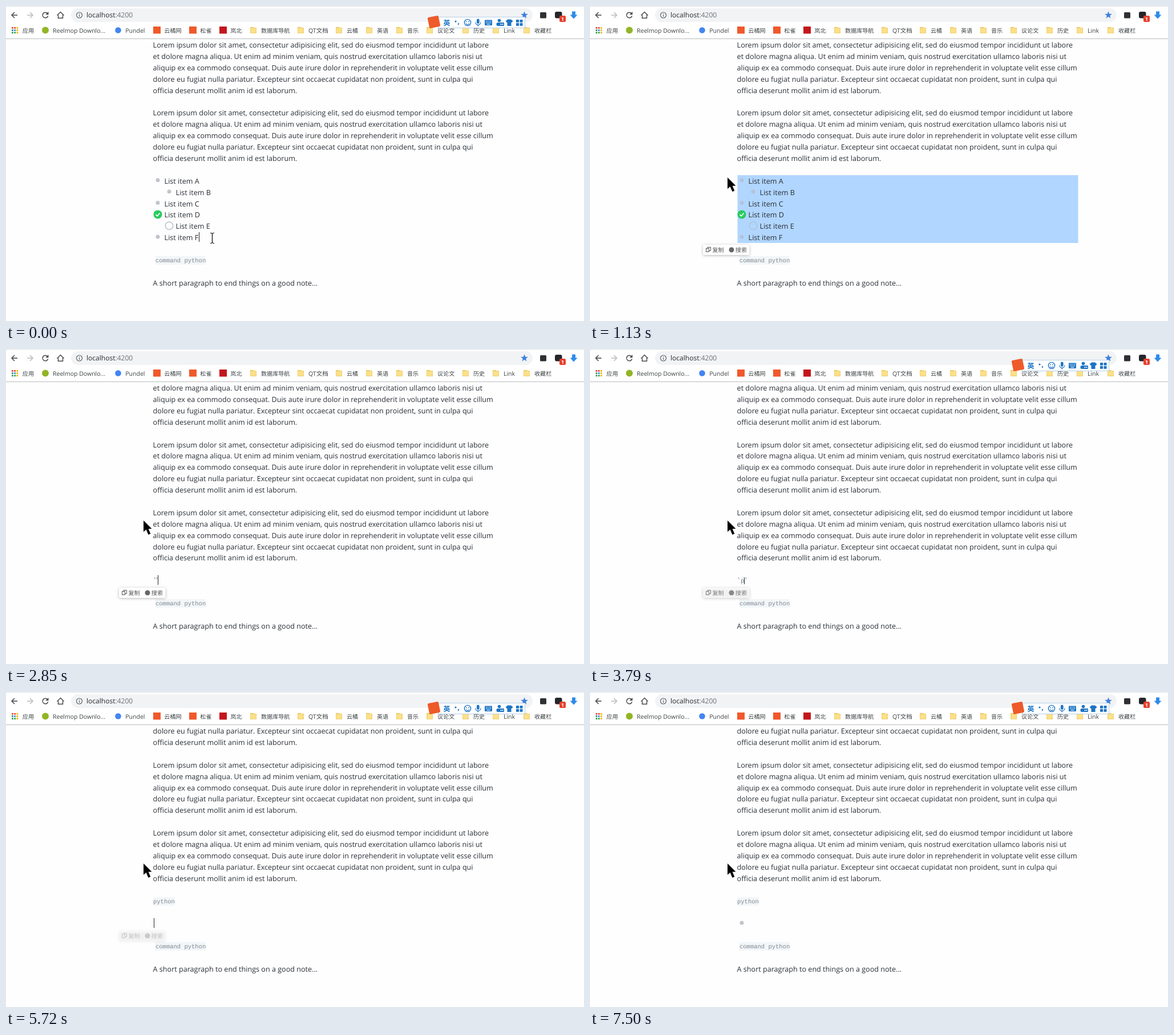
Write an HTML page with a canvas that moves like this. It is 1013 px wide and 553 px high and loops after 8 s.

```html
<!DOCTYPE html>
<html lang="zh">
<head>
<meta charset="utf-8">
<title>Notes editor</title>
<style>
html, body { margin: 0; width: 100%; height: 100%; overflow: hidden; background: #fefefe; }
canvas { display: block; width: 1013px; height: 553px; }
</style>
</head>
<body>
<canvas id="stage" width="1013" height="553"></canvas>
<script>
const ctx = document.getElementById('stage').getContext('2d');
ctx.textRendering = 'geometricPrecision';

const LOOP = 8000, PITCH = 19.88, LEFT = 258, CHAR = 6.3;
const INK = '#2a2f36', GREY = '#5f6368', BLUE = '#1b74c5';
const BODY = '12.58px "Open Sans", sans-serif';
const MONO = '10.5px "Liberation Mono", monospace';
const SMALL = '10.5px "Open Sans", "Noto Sans CJK SC", "Noto Sans CJK", sans-serif';
const HAN = '10.1px "Noto Sans CJK SC", "Noto Sans CJK", sans-serif';

const LOREM = [
  'Lorem ipsum dolor sit amet, consectetur adipisicing elit, sed do eiusmod tempor incididunt ut labore',
  'et dolore magna aliqua. Ut enim ad minim veniam, quis nostrud exercitation ullamco laboris nisi ut',
  'aliquip ex ea commodo consequat. Duis aute irure dolor in reprehenderit in voluptate velit esse cillum',
  'dolore eu fugiat nulla pariatur. Excepteur sint occaecat cupidatat non proident, sunt in culpa qui',
  'officia deserunt mollit anim id est laborum.'
];
const ITEMS = [['A', 0, 'dot'], ['B', 1, 'dot'], ['C', 0, 'dot'], ['D', 0, 'done'], ['E', 1, 'todo'], ['F', 0, 'dot']];
const KEYS = [3710, 4020, 4260, 4560, 4680, 4790];
const FOLDERS = [[428, '数据库导航'], [511, 'QT文档'], [578, '云橘'], [631, '英语'], [684, '音乐'],
  [737, '议论文'], [800, '历史'], [853, 'Link'], [907, '收藏栏']];

// Last value whose start time has been reached
const at = (t, steps) => steps.reduce((v, s) => t >= s[0] ? s[1] : v, steps[0][1]);
const within = (t, a, b) => t >= a && t < b;
const rowY = k => 68.5 + PITCH * k;

function text(s, x, y, font, color) {
  ctx.font = font;
  ctx.fillStyle = color;
  ctx.fillText(s, x, y);
}
function rect(x, y, w, h, color) {
  ctx.fillStyle = color;
  ctx.fillRect(x, y, w, h);
}
function round(x, y, w, h, r, color) {
  ctx.beginPath();
  ctx.roundRect(x, y, w, h, r);
  ctx.fillStyle = color;
  ctx.fill();
}
function disc(x, y, r, color) {
  ctx.beginPath();
  ctx.arc(x, y, r, 0, 7);
  ctx.fillStyle = color;
  ctx.fill();
}
function ring(x, y, r, color, w) {
  ctx.beginPath();
  ctx.arc(x, y, r, 0, 7);
  ctx.strokeStyle = color;
  ctx.lineWidth = w;
  ctx.stroke();
}
function trace(pts) {
  ctx.beginPath();
  for (let i = 0; i < pts.length; i += 2) ctx.lineTo(pts[i], pts[i + 1]);
}
function line(pts, color, w) {
  trace(pts);
  ctx.strokeStyle = color;
  ctx.lineWidth = w;
  ctx.stroke();
}
function poly(pts, color) {
  trace(pts);
  ctx.fillStyle = color;
  ctx.fill();
}

function row(s, k, x = LEFT) {
  text(s, x - 0.4, Math.round(rowY(k) + 4.7), BODY, INK);
}
function paragraph(k) {
  LOREM.forEach((s, i) => row(s, k + i));
}
function code(s, x, k) {
  const y = Math.round(rowY(k));
  rect(x, y - 7, s.length * CHAR, 15, '#f2f6f8');
  text(s, x, y + 4, MONO, '#7f8992');
}
function caret(x, small) {
  rect(x, small ? 401 : 397, 1, small ? 12 : 17, '#222');
}

function marker(kind, x, y, selected) {
  if (kind === 'dot') disc(x, y - 1.3, 3.5, selected ? '#b3c3d6' : '#c1c5cc');
  if (kind === 'todo') ring(x, y - 0.8, 6.8, selected ? '#b0c3d8' : '#bcc1c8', 1.5);
  if (kind === 'done') {
    disc(x, y - 0.8, 7.5, '#27cc5f');
    line([x - 3.4, y - 0.6, x - 0.9, y + 2, x + 3.7, y - 3.2], '#fff', 1.7);
  }
}
function list(t) {
  const first = at(t, [[0, 6], [240, 5], [290, 3], [360, 1], [440, 0]]);
  ITEMS.forEach(([name, depth, kind], i) => {
    const k = 12 + i, x = LEFT + depth * 20, on = i >= first;
    const fresh = i === first && t < 510;
    if (on) {
      const top = Math.round(rowY(k) - 10.2), end = Math.round(rowY(k + 1) - 10.2);
      rect(258.5, top, 597, end - top, fresh ? '#bcdcff' : '#b1d6ff');
    }
    marker(kind, x + 8, rowY(k), on);
    row('List item ' + name, k, x + 20);
  });
  if (t < 70) caret(338, false);
}

function tick(x) {
  text('`', x - 2, 411, BODY, '#555b62');
}
function squiggle(x, w) {
  const pts = [];
  for (let i = 0; i <= w; i += 1.5) pts.push(x + i, 411.5 + (i / 1.5 % 2 ? 1 : -0.5));
  line(pts, '#e8604c', 0.9);
}
function typing(t) {
  const n = KEYS.filter(k => t >= k).length;
  if (n) {
    const end = 264 + n * CHAR;
    tick(259);
    code('python'.slice(0, n), 264, 17);
    if (n > 1 && n < 6) squiggle(265, n * CHAR - 1);
    tick(end + 1.5);
    if (t < 5260) caret(Math.round(end), true);
    else caret(308, true);
    return;
  }
  if (t >= 2300) tick(259);
  if (t >= 2850) tick(262.8);
  if (!within(t, 2060, 2300)) caret(at(t, [[0, 259], [2300, 262], [2850, 266], [3240, 262]]), false);
}
function afterEnter(t) {
  code('python', LEFT, 15);
  if (t < 6190) caret(259, false);
  else if (within(t, 6740, 6880)) {
    row('-', 17);
    caret(264, false);
  } else if (t >= 6880) {
    marker('dot', 266, rowY(17), false);
    if (t < 7500) caret(278, false);
  }
}
function page(t) {
  rect(0, 58, 1013, 495, '#fefefe');
  if (t < 1440) {
    [0, 6].forEach(paragraph);
    list(t);
  } else if (t < 5720) {
    [-1, 5, 11].forEach(paragraph);
    typing(t);
  } else {
    [-3, 3, 9].forEach(paragraph);
    afterEnter(t);
  }
  code('command python', 262, 19);
  row('A short paragraph to end things on a good note...', 21);
}

function popup(t) {
  const alpha = at(t, [[0, 0], [1130, 1], [3710, 0.85], [3790, 0.75], [4020, 0.65], [4180, 0.6],
    [4410, 0.5], [5110, 0.4], [5720, 0.28], [6190, 0.12], [6270, 0]]);
  if (!alpha) return;
  ctx.save();
  ctx.globalAlpha = alpha;
  ctx.shadowColor = 'rgba(0,0,0,.28)';
  ctx.shadowBlur = 5;
  ctx.shadowOffsetY = 1;
  round(198, 419, 81.5, 18, 3, '#fff');
  ctx.shadowColor = 'transparent';
  ctx.strokeStyle = '#555';
  ctx.lineWidth = 1;
  ctx.strokeRect(203.5, 425.5, 5, 6);
  line([206, 425, 206, 423.5, 211.5, 423.5, 211.5, 429.5, 209, 429.5], '#555', 1);
  text('复制', 214.5, 431.5, HAN, '#555');
  disc(248, 428, 4.5, '#666');
  text('搜索', 254.8, 431.5, HAN, '#555');
  ctx.restore();
}

function star(x, y, r, color) {
  const pts = [];
  for (let i = 0; i < 10; i++) {
    const a = i * Math.PI / 5 - Math.PI / 2, d = i % 2 ? r * 0.42 : r;
    pts.push(x + d * Math.cos(a), y + d * Math.sin(a));
  }
  poly(pts, color);
}
function navArrow(x, dir, color) {
  line([x - 5 * dir, 16, x + 5 * dir, 16], color, 1.6);
  line([x, 11, x + 5 * dir, 16, x, 21], color, 1.6);
}
function folder(x, label) {
  rect(x, 37, 6, 3, '#eac65c');
  rect(x, 38, 11, 10, '#fbe08a');
  ctx.strokeStyle = '#eed070';
  ctx.lineWidth = 1;
  ctx.strokeRect(x + 0.5, 38.5, 10, 9);
  text(label, x + 19, 46.5, /^[A-Z]/.test(label) ? SMALL : HAN, '#3c4043');
}
function toolbar() {
  rect(0, 0, 1013, 58, '#fff');
  rect(0, 0, 1013, 1, '#dfe2e6');
  rect(0, 57, 1013, 1, '#b9bbbe');
  navArrow(15, -1, '#4a4d51');
  navArrow(42, 1, '#bcbec1');
  ctx.beginPath();
  ctx.arc(69, 16, 4.8, 0.3, 5.5);
  ctx.strokeStyle = '#4a4d51';
  ctx.lineWidth = 1.6;
  ctx.stroke();
  poly([74.5, 10, 74.5, 15.3, 69.2, 15.3], '#4a4d51');
  line([89.5, 16.5, 95.5, 10.5, 101.5, 16.5], '#4a4d51', 1.5);
  line([91.5, 15.5, 91.5, 21.3, 99.5, 21.3, 99.5, 15.5], '#4a4d51', 1.5);

  round(114, 4, 809, 24, 12, '#f1f3f4');
  ring(128.5, 16, 5, GREY, 1.2);
  rect(128, 15.3, 1.2, 3.5, GREY);
  rect(128, 13, 1.2, 1.2, GREY);
  text('localhost', 141, 20, '12.05px "Open Sans", sans-serif', '#2a2c30');
  text(':4200', 191.5, 20, '12.05px "Open Sans", sans-serif', '#6c7075');
  star(908.5, 16, 6.7, '#3e7fe0');

  round(936, 11, 11, 10.5, 1.5, '#2f3033');
  round(962, 10, 12.5, 11.5, 3, '#25262a');
  round(970, 17, 11, 11, 2, '#e8402c');
  text('1', 973, 26, 'bold 8.5px "Open Sans", sans-serif', '#fff');
  poly([992, 9.5, 998, 9.5, 998, 15.5, 1001.5, 15.5, 995, 22.5, 988.5, 15.5, 992, 15.5], '#2f8bea');
}
function bookmarks() {
  ['#e8453c', '#e8453c', '#f5b400', '#2f9e58', '#4285f4', '#f5b400', '#2f9e58', '#2f9e58', '#f5b400']
    .forEach((c, i) => rect(10 + i % 3 * 4.2, 37 + Math.floor(i / 3) * 4.2, 2.8, 2.8, c));
  text('应用', 28.8, 46.5, HAN, '#3c4043');
  disc(69, 42.5, 6, '#92b526');
  text('Reelmop Downlo...', 82, 46.5, SMALL, '#3c4043');
  disc(196.5, 42.5, 5.3, '#4285f4');
  text('Pundel', 209.3, 46.5, SMALL, '#3c4043');
  [[258, '#f0592b', '云橘网', 277], [321, '#f0592b', '松雀', 340], [374, '#c3161c', '岚北', 393]]
    .forEach(([x, c, label, tx]) => {
      rect(x, 36, 13, 12.5, c);
      text(label, tx + 0.3, 46.5, HAN, '#3c4043');
    });
  FOLDERS.forEach(f => folder(...f));
}

function inputBar() {
  rect(757.5, 20, 152, 18.5, '#fff');
  ctx.strokeStyle = '#b5d0e8';
  ctx.lineWidth = 1;
  ctx.strokeRect(757.5, 19.5, 152, 19);
  ctx.save();
  ctx.translate(750, 28);
  ctx.rotate(-0.2);
  round(-9.7, -9.7, 19.4, 19.4, 2, '#ee5a2a');
  ctx.restore();

  text('英', 766.5, 33.5, 'bold 12px "Noto Sans CJK SC", "Noto Sans CJK", sans-serif', BLUE);
  disc(788, 27, 1.6, BLUE);
  line([793.5, 30, 792.5, 33], BLUE, 1.8);
  ring(809, 29, 5.6, BLUE, 1.4);
  disc(807, 27.5, 0.9, BLUE);
  disc(811, 27.5, 0.9, BLUE);
  ctx.beginPath();
  ctx.arc(809, 29.5, 3, 0.3, 2.84);
  ctx.lineWidth = 1.1;
  ctx.stroke();

  round(825, 22.5, 4.6, 8.5, 2.3, BLUE);
  ctx.beginPath();
  ctx.arc(827.3, 28.5, 4.6, 0, Math.PI);
  ctx.lineWidth = 1.2;
  ctx.stroke();
  line([827.3, 33, 827.3, 35.5], BLUE, 1.4);

  round(839, 24.5, 13, 9.5, 1, BLUE);
  for (let i = 0; i < 8; i++) rect(841 + i % 4 * 2.6, 26.3 + Math.floor(i / 4) * 2.4, 1.3, 1.2, '#fff');
  rect(842.5, 31.4, 6, 1.1, '#fff');

  disc(864.5, 25.5, 2.8, BLUE);
  round(859.5, 29, 9, 6, 2.5, BLUE);
  round(865, 29, 8, 6, 1, BLUE);
  rect(866.5, 31, 1.8, 2, '#fff');
  rect(869.5, 31, 1.8, 2, '#fff');

  poly([879, 23.5, 885, 23.5, 888.5, 26.5, 886.5, 29, 885.5, 28.5, 885.5, 35, 878.5, 35, 878.5, 28.5,
    877.5, 29, 875.8, 26.5], BLUE);
  [[894, 24], [900.5, 24], [894, 30], [900.5, 30]].forEach(([x, y]) => rect(x, y, 5, 4.8, BLUE));
}
function barVisible(t) {
  return ![[240, 900], [980, 1530], [2850, 2940], [4100, 4180], [4620, 4700], [6800, 6880]]
    .some(([a, b]) => within(t, a, b));
}

function pointer(t) {
  if (t < 240) {
    const y = t < 70 ? 398 : 394.5;
    line([358, y + 0.5, 360, y + 0.5, 361.5, y + 2, 363, y + 0.5, 365, y + 0.5], '#222', 1.2);
    line([361.5, y + 1.5, 361.5, y + 17.5], '#222', 1.4);
    line([358, y + 18.5, 360, y + 18.5, 361.5, y + 17, 363, y + 18.5, 365, y + 18.5], '#222', 1.2);
    return;
  }
  const [x, y] = at(t, [[240, [310, 385]], [290, [268, 345]], [360, [243, 306]], [440, [241.5, 302.5]], [510, [241, 301]]]);
  if (t < 820) disc(x, y + 0.5, 10, '#fbf65c');
  trace([x, y, x, y + 20, x + 4.6, y + 16, x + 8.5, y + 25, x + 12.3, y + 23.3, x + 8.6, y + 14.7, x + 14.5, y + 14.5]);
  ctx.closePath();
  ctx.strokeStyle = '#fff';
  ctx.lineWidth = 1.6;
  ctx.stroke();
  ctx.fillStyle = '#000';
  ctx.fill();
}

function draw(now) {
  const t = now % LOOP;
  page(t);
  popup(t);
  toolbar();
  bookmarks();
  if (barVisible(t)) inputBar();
  pointer(t);
  requestAnimationFrame(draw);
}
requestAnimationFrame(draw);
</script>
</body>
</html>
```
